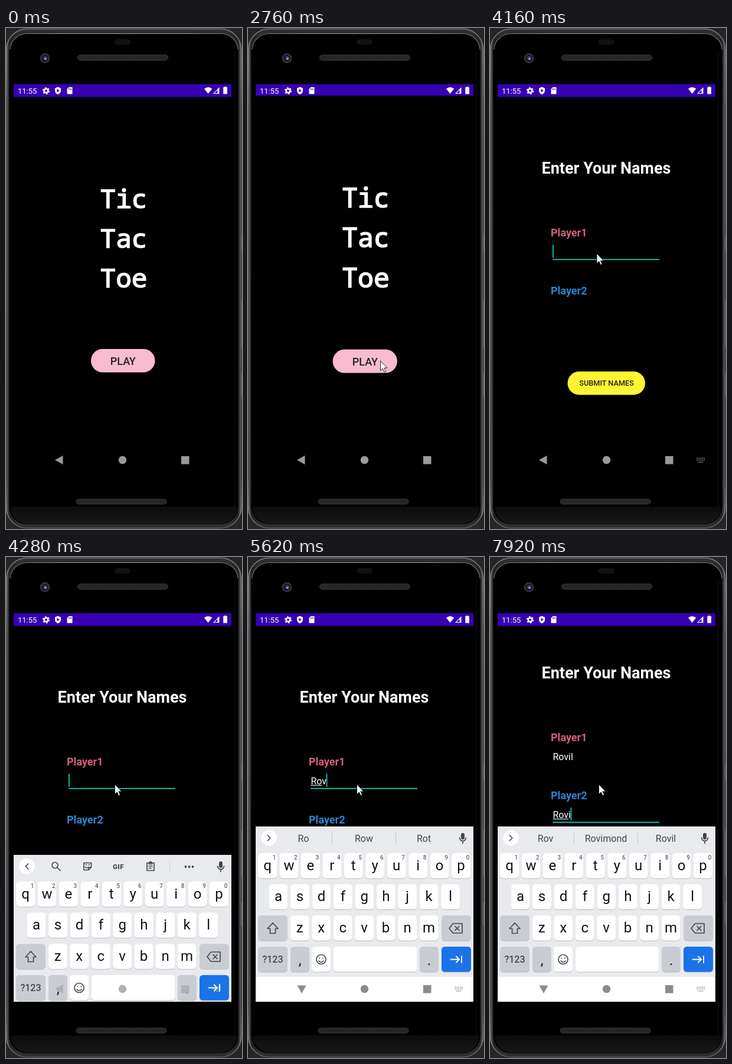
These frames come from a looping animation (400 by 846 pixels, 8000 ms). An HTML page:

```html
<!DOCTYPE html>
<html lang="en">
<head>
<meta charset="utf-8">
<title>Tic Tac Toe</title>
<style>
  html, body { margin: 0; width: 100%; height: 100%; overflow: hidden; background: #262626; }
  svg { display: block; width: 400px; height: 846px; font-family: Roboto, "Noto Sans", sans-serif; }
  .mid { text-anchor: middle; }
  .mono { font: 44.5px "Noto Sans Mono", "DejaVu Sans Mono", monospace; fill: #fff; stroke: #fff; stroke-width: 1.7px; }
  .label { font-size: 18px; font-weight: 700; }
  .typed { font-size: 16px; fill: #fff; }
  .key { font-size: 24px; fill: #111; }
  .hint { font-size: 10px; font-weight: 500; fill: #5f6368; }
  .chip { font-size: 16px; fill: #44474b; }
  .line { fill: none; stroke: #44474b; stroke-width: 1.7px; stroke-linejoin: round; stroke-linecap: round; }
</style>
</head>
<body>
<svg viewBox="0 0 400 846">
  <defs>
    <clipPath id="display"><rect x="13" y="95" width="369" height="656"/></clipPath>
    <pattern id="mesh" width="3" height="3" patternUnits="userSpaceOnUse">
      <rect width="3" height="3" fill="#2c2c2c"/><circle cx="1.5" cy="1.5" r="1" fill="#171717"/>
    </pattern>
    <linearGradient id="rim">
      <stop offset="0" stop-color="#5c5e5e"/><stop offset=".014" stop-color="#202121"/>
      <stop offset=".05" stop-color="#2e3030"/><stop offset=".95" stop-color="#2e3030"/>
      <stop offset=".986" stop-color="#202121"/><stop offset="1" stop-color="#5c5e5e"/>
    </linearGradient>
    <linearGradient id="edge" x2="0" y2="1">
      <stop offset="0" stop-color="#777a79"/><stop offset=".06" stop-color="#858887"/>
      <stop offset=".16" stop-color="#5a5c5c"/><stop offset=".9" stop-color="#4c4e4e"/>
      <stop offset=".97" stop-color="#858887"/><stop offset="1" stop-color="#5c5e5e"/>
    </linearGradient>
    <linearGradient id="glint">
      <stop offset="0" stop-color="#6a6c6c"/><stop offset=".25" stop-color="#a5aaa8"/>
      <stop offset=".75" stop-color="#a5aaa8"/><stop offset="1" stop-color="#6a6c6c"/>
    </linearGradient>
    <linearGradient id="chin" x2="0" y2="1">
      <stop offset="0" stop-color="#0c0c0c"/><stop offset="1" stop-color="#171717"/>
    </linearGradient>
  </defs>

  <!-- phone body -->
  <rect width="400" height="846" fill="#262626"/>
  <rect x=".7" y="1.5" width="398" height="843" rx="35" fill="url(#rim)" stroke="url(#edge)" stroke-width="1.5"/>
  <rect x="5" y="9" width="389" height="829" rx="30" fill="#000" stroke="#1e1f1f"/>
  <path d="M8 808H392A29 29 0 0 1 363 837H37A29 29 0 0 1 8 808Z" fill="url(#chin)"/>
  <path d="M7 36A29 27 0 0 1 36 9.5H364A29 27 0 0 1 393 36" fill="none" stroke="url(#glint)" stroke-width="1.2"/>
  <path d="M387 40V808" stroke="#141414"/>
  <path d="M399 349V377M399 460V540M399 582V622" stroke="#5c5e5e" stroke-width="2"/>
  <rect x="184" y="19" width="27" height="9" rx="4.5" fill="#121212"/>
  <circle cx="66" cy="51" r="8.5" fill="#303032"/>
  <circle cx="66" cy="51" r="5.5" fill="#14151f"/>
  <circle cx="66.500" cy="51" r="3.300" fill="#39428c"/>
  <circle cx="67" cy="52" r="1.500" fill="#a4aee0"/>
  <rect x="121.500" y="45.500" width="153" height="9" rx="4.500" fill="url(#mesh)" stroke="#3a3a3a"/>
  <rect x="119" y="795.500" width="153" height="8.500" rx="4.200" fill="url(#mesh)" stroke="#3a3a3a"/>

  <g clip-path="url(#display)">
    <g id="home">
      <rect x="13" y="95" width="369" height="656" fill="#000"/>
      <rect x="13" y="95" width="369" height="21.500" fill="#3700b3"/>
      <g class="mono mid">
        <text x="199.500" y="303.500">Tic</text>
        <text x="199.500" y="370.500">Tac</text>
        <text x="199.500" y="437.500">Toe</text>
      </g>
      <rect x="144" y="542" width="108.500" height="39.500" rx="19.700" fill="#f8bbd0"/>
      <text class="mid" x="198.300" y="568.500" font-size="18" font-weight="500" fill="#222">PLAY</text>
    </g>

    <g id="form">
      <rect x="13" y="95" width="369" height="656" fill="#000"/>
      <rect x="13" y="95" width="369" height="21.500" fill="#3700b3"/>
      <g id="page">
        <text class="mid" x="197" y="246" font-size="27" font-weight="700" fill="#fff">Enter Your Names</text>
        <text class="label" x="103" y="352" fill="#d45f79">Player1</text>
        <text class="label" x="103" y="450" fill="#2c84d0">Player2</text>
        <text class="typed" id="name1" x="106.500" y="383.500"></text>
        <text class="typed" id="name2" x="106.500" y="481.500"></text>
        <g id="focus">
          <rect x="106" y="390" width="181" height="1.800" fill="#03c9b6"/>
          <rect id="compose" x="106.500" y="385" height="1" fill="#fff"/>
          <rect id="caret" y="366" width="1.800" height="22" fill="#03c9b6"/>
        </g>
        <g id="submit">
          <rect x="131.500" y="580" width="131.500" height="39.500" rx="19.700" fill="#fff434"/>
          <text class="mid" x="197.600" y="604.200" font-size="12.700" font-weight="500" fill="#222">SUBMIT NAMES</text>
        </g>
      </g>
    </g>

    <g id="board">
      <rect x="13" y="455" width="369" height="254" fill="#e8eaed"/>
      <rect x="13" y="709" width="369" height="44" fill="#fff"/>
      <g id="keys"></g>
      <circle cx="35.500" cy="475" r="13.500" fill="#cfd1d4"/>
      <circle cx="35.500" cy="474.500" r="13.500" fill="#fff"/>
      <path id="chevron" class="line" d="M2.300 -4.500L-2.300 0L2.300 4.500"/>
      <g id="tools">
        <g class="line">
          <circle cx="83" cy="472.500" r="5"/><path d="M87 476.500L92 481.500"/>
          <path d="M132 468.500H144.500V476L140 480.500H132ZM144.500 476H140V480.500M134.500 475.500Q137 478.500 139.500 475.500"/>
          <path d="M239 468.500H251V481.500H239ZM242.500 468V470.500H247.500V468M242 474H248M242 477.500H246"/>
        </g>
        <path d="M135 471.500h1.800m3 0h1.800M243 467h4" stroke="#44474b" stroke-width="2"/>
        <text class="mid" x="190.500" y="478.500" font-size="11.500" font-weight="900" letter-spacing=".5" fill="#44474b">GIF</text>
        <path d="M277.500 465V485" stroke="#cfd1d4"/>
        <g fill="#44474b"><circle cx="304.500" cy="475" r="1.900"/><circle cx="310.500" cy="475" r="1.900"/><circle cx="316.500" cy="475" r="1.900"/></g>
      </g>
      <g id="chips" class="chip mid">
        <path d="M142.500 464V486M250.500 464V486" stroke="#c6c8cc"/>
        <text x="94" y="481"></text><text x="196.500" y="481"></text><text x="298" y="481"></text>
      </g>
      <rect x="361" y="466" width="6" height="11" rx="3" fill="#44474b"/>
      <path class="line" d="M358.500 474A5.500 5.500 0 0 0 369.500 474M364 480V483.500"/>
    </g>

    <g id="nav">
      <path id="back" d="M-7.500 0L6 -7.500V7.500Z"/>
      <circle cx="197.500" cy="729.500" r="6.700"/>
      <rect x="297" y="723" width="13.500" height="13.500"/>
      <path id="switcher" fill="none" stroke-width="1.700" stroke-dasharray="1.700 1.300"
        d="M350.500 726.500H364M350.500 729.500H364M353.500 732.800H361"/>
    </g>

    <!-- status icons -->
    <g fill="#fff">
      <text x="20" y="110.500" font-size="13">11:55</text>
      <circle cx="68" cy="106" r="3.300" fill="none" stroke="#fff" stroke-width="2.600"/>
      <circle cx="68" cy="106" r="5.200" fill="none" stroke="#fff" stroke-width="1.800" stroke-dasharray="2.700 2.745"/>
      <path d="M88 99.500L93 101.700V105.500C93 108.800 91 111 88 112.200C85 111 83 108.800 83 105.500V101.700Z"/>
      <path d="M86.300 103L91 105.800L86.300 108.600Z" fill="#3700b3"/>
      <path d="M106.500 100H112.500V111.500H103.500V103Z"/>
      <path d="M106.300 102v2.500m2-2.500v2.500m2-2.500v2.500" stroke="#3700b3"/>
      <path d="M336 102.500Q342.500 97.500 349.300 102.500L342.600 111Z"/>
      <path d="M361.500 100V111H351Z"/><path d="M358.500 104.500V110H353.500Z" fill="#3700b3"/>
      <path d="M370 100V99H373.500V100H375V111.500H368.300V100Z"/>
    </g>
  </g>

  <path id="cursor" d="M0 0V16.500L3.800 13L6.500 19L9 18L6.300 12H11.600Z" fill="#fff" stroke="#111" stroke-width=".9"/>
</svg>

<script>
const LOOP = 8000;
const $ = id => document.getElementById(id);
const show = (id, on) => $(id).style.display = on ? "" : "none";

// Value of the last [time, ...values] row that has begun.
const at = (rows, t) => rows.reduce((now, row) => row[0] <= t ? row.slice(1) : now, []);

const CURSOR = [
  [1390, 347, 634], [1530, 303, 613], [1655, 260, 590], [1780, 230, 574], [1930, 226, 566],
  [2050, 224.5, 562], [3270, 227, 559], [3390, 231, 555], [3530, 222, 515], [3650, 208, 470],
  [3770, 194, 425], [3890, 184, 392], [4010, 181, 381], [4280, 184.5, 384]
];
const HOME_ZOOM = [[0, 1], [2760, 1.007]];
const FORM_ZOOM = [[2910, 0.95], [3030, 0.988], [3150, 0.997], [3270, 1]];
const SCROLL = [[0, 0], [6610, -5], [6760, -40], [6910, -41]];
const BOARD = [[4280, 48], [4400, 0]];
const BACK_TURN = [[0, 0], [4550, -45], [4670, -90]];
const NAME1 = [[0, ""], [5070, "R"], [5470, "Ro"], [5620, "Rov"], [5740, "Rovi"], [5890, "Rovil"]];
const NAME2 = [[0, ""], [7160, "R"], [7620, "Ro"], [7920, "Rovi"]];
// The first suggestion is also the underlined part of the word.
const CHIPS = [
  [5320, "R", "Run", "Red"], [5620, "Ro", "Row", "Rot"], [5740, "Rov", "Rovimond", "Rovil"],
  [5890, "Rovi", "Rovimond", "Rovil"], [6040, "Rovil", "Rovimond", "Rovilo"], [6760],
  [7470, "R", "Run", "Red"], [7770, "Ro", "Row", "Rot"], [7920, "Rov", "Rovimond", "Rovil"]
];

function buildKeys() {
  let out = "";
  const key = (x, y, w, fill) => {
    out += `<rect x="${x}" y="${y + 1}" width="${w}" height="42.5" rx="5.5" fill="#b9bcc1"/>` +
      `<rect x="${x}" y="${y}" width="${w}" height="42.5" rx="5.5" fill="${fill}"/>`;
  };
  const text = (s, x, y, cls, extra = "") => out += `<text class="${cls} mid" x="${x}" y="${y}" ${extra}>${s}</text>`;
  const icon = d => out += `<path class="line" d="${d}"/>`;
  const GREY = "#c9ccd2", STEP = 36.45;

  [["qwertyuiop", 17, 500], ["asdfghjkl", 35.5, 552.6], ["zxcvbnm", 71.8, 605.2]].forEach(([row, x0, y], r) => {
    [...row].forEach((ch, i) => {
      const x = x0 + i * STEP;
      key(x, y, 32, "#fff");
      text(ch, x + 16, y + 28.7, "key");
      if (!r) text((i + 1) % 10, x + 27.5, y + 10.5, "hint");
    });
  });
  key(17, 605.2, 50, GREY);
  key(328, 605.2, 50, GREY);
  icon("M42 618L51 627.500H46.500V635.500H37.500V627.500H33Z");
  icon("M341 627L347.500 619H363V635H347.500ZM351 623.500L358 630.500M358 623.500L351 630.500");

  const y = 658;
  key(17, y, 50, GREY);
  text("?123", 42, y + 27, "key", 'style="font-size:16px;font-weight:500;fill:#44474b"');
  key(72, y, 32, GREY);
  text(",", 88, y + 31, "key");
  key(108, y, 32, "#fff");
  icon("M132 679.500A8 8 0 1 1 116 679.500A8 8 0 1 1 132 679.500M120 682Q124 686.500 128 682M121 677v.5M127 677v.5");
  key(145, y, 141.5, "#fff");
  key(291, y, 32, GREY);
  text(".", 307, y + 31, "key");
  key(328, y, 50, "#1a73e8");
  out += '<path class="line" style="stroke:#fff;stroke-width:2px" d="M343.500 679.500H358M353 674.500L358 679.500L353 684.500M362 674V685"/>';
  $("keys").innerHTML = out;
}

function zoom(id, scale) {
  show(id, scale !== undefined);
  if (scale) $(id).setAttribute("transform", `translate(197.5 423) scale(${scale}) translate(-197.5 -423)`);
}

function drawField(t, chips) {
  const second = t >= 6610;
  const field = $(second ? "name2" : "name1");
  $("name1").textContent = at(NAME1, t)[0];
  $("name2").textContent = at(NAME2, t)[0];
  show("focus", t >= 4160);
  $("focus").setAttribute("transform", `translate(0 ${second ? 98 : 0})`);
  const word = field.textContent;
  const wide = n => n ? field.getSubStringLength(0, n) : 0;
  const marked = chips.length ? Math.min(chips[0].length, word.length) : 0;
  $("compose").setAttribute("width", wide(marked));
  $("caret").setAttribute("x", 106 + wide(word.length));
  show("caret", t < 4670 || t >= 5070);
}

function drawBoard(t, chips) {
  const [drop] = at(BOARD, t);
  show("board", drop !== undefined);
  $("board").setAttribute("transform", `translate(0 ${drop || 0})`);
  const suggesting = chips.length > 0;
  show("tools", !suggesting);
  show("chips", suggesting);
  $("chevron").setAttribute("transform", `translate(35.5 474.5) scale(${suggesting ? -1 : 1} 1)`);
  $("chips").querySelectorAll("text").forEach((el, i) => el.textContent = chips[i] || "");

  const tint = t < 4280 ? "#9a9a9a" : t < 4400 ? "#b0b1b3" : "#8b8b8b";
  $("nav").setAttribute("fill", tint);
  $("switcher").setAttribute("stroke", tint);
  show("switcher", t >= 4160);
  const [turn] = at(BACK_TURN, t);
  $("back").setAttribute("transform", `translate(${turn === -90 ? 91 : 90.5} 729.500) rotate(${turn})`);
}

function draw(t) {
  const [x, y] = at(CURSOR, t);
  show("cursor", x !== undefined);
  if (x) $("cursor").setAttribute("transform", `translate(${x} ${y})`);
  zoom("home", t < 2910 ? at(HOME_ZOOM, t)[0] : undefined);
  zoom("form", at(FORM_ZOOM, t)[0]);
  $("page").setAttribute("transform", `translate(0 ${at(SCROLL, t)[0]})`);
  const chips = at(CHIPS, t);
  drawField(t, chips);
  drawBoard(t, chips);
}

buildKeys();
const start = performance.now();
function tick() {
  draw((performance.now() - start) % LOOP);
  requestAnimationFrame(tick);
}
tick();
</script>
</body>
</html>
```
